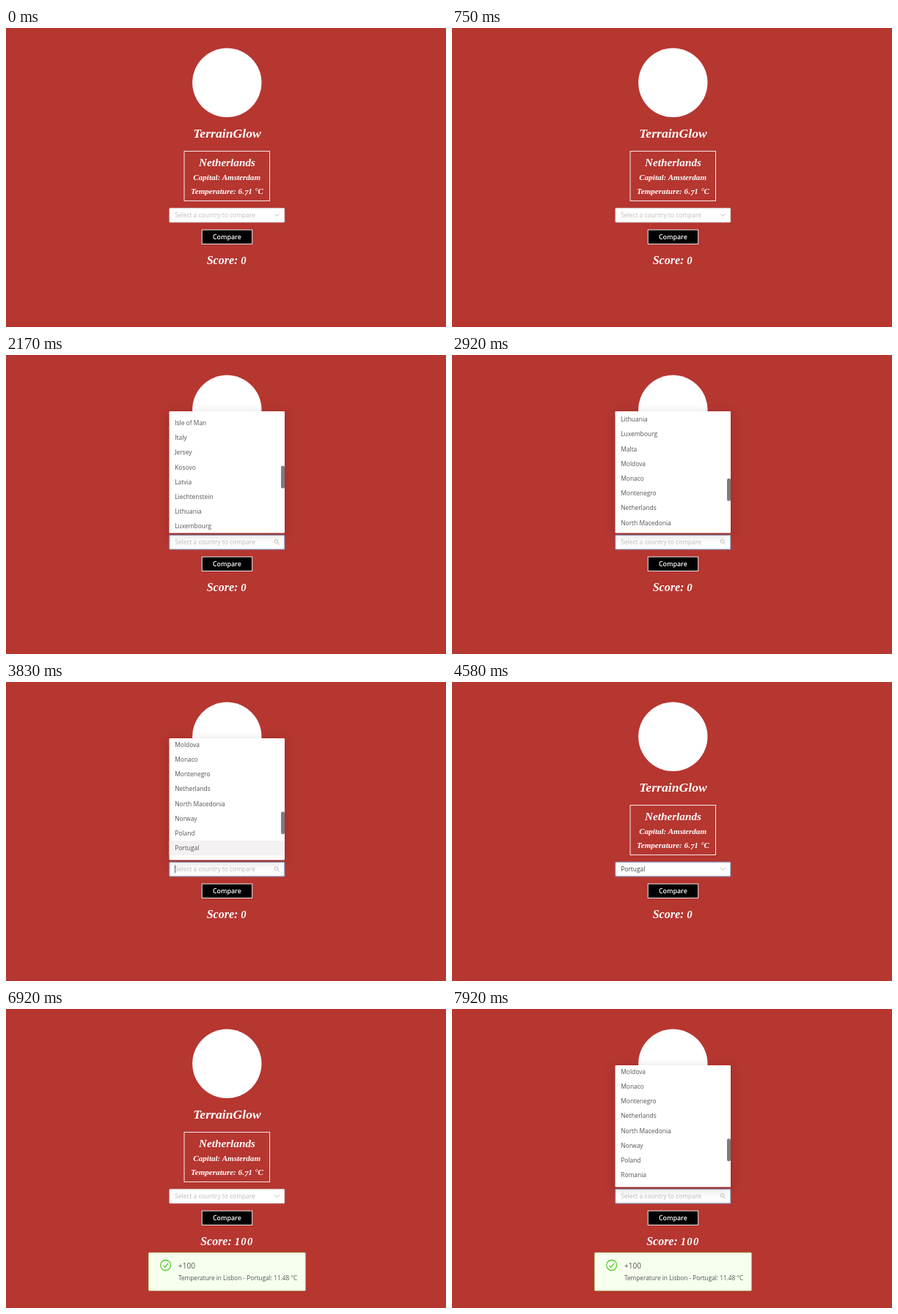
Recreate the animation shown at these times as an HTML page. Size 600 by 409 pixels, loop 8000 ms.

```html
<!DOCTYPE html>
<html lang="en">
<head>
<meta charset="utf-8">
<title>TerrainGlow</title>
<style>
  html, body { margin: 0; width: 100%; height: 100%; overflow: hidden; background: #b63630; }
  #stage { display: block; width: 100vw; height: 100vh; }
  text { white-space: pre; }
  .serif { font: italic bold 11.1px "Liberation Serif", serif; fill: #fff; text-anchor: middle; }
  .sans { font: 8.45px "Open Sans", "Noto Sans", sans-serif; fill: #555; }
  .icon { fill: none; stroke: #b5b5b5; stroke-width: .9; }
  #panel { filter: drop-shadow(0 3px 7px rgba(0, 0, 0, .17)); }
</style>
</head>
<body>
<svg id="stage" viewBox="0 0 600 409">
  <rect width="600" height="409" fill="#b63630"/>
  <circle cx="301.3" cy="74.8" r="47.2" fill="#fff"/>
  <text class="serif" x="301.5" y="149.8" style="font-size:17.7px">TerrainGlow</text>

  <rect x="243" y="168.6" width="116.6" height="67.8" fill="none" stroke="#fff" stroke-width=".9"/>
  <text class="serif" x="301.5" y="188.8" style="font-size:15.2px">Netherlands</text>
  <text class="serif" x="301.2" y="208.2">Capital: Amsterdam</text>
  <text class="serif" id="temperature" x="301.5" y="226.6"></text>

  <rect id="glow" x="222" y="245.5" width="158.6" height="21.2" rx="1.5" fill="#6fa0d8"/>
  <rect id="field" x="222.9" y="246.4" width="156.8" height="19.4" rx="1" fill="#fff" stroke-width=".8"/>
  <text class="sans" id="value" x="230.2" y="259.3"></text>
  <path id="caret" d="M230.5 250.5v11" stroke="#444" stroke-width=".8"/>
  <path class="icon" id="chevron" d="M366.3 254.2l3.1 3.4 3.1-3.4"/>
  <g class="icon" id="search"><circle cx="368.6" cy="255" r="2.4"/><path d="M370.4 256.8l2.6 2.6"/></g>

  <rect x="267.2" y="276.1" width="68.5" height="19.3" stroke="#fff" stroke-width=".9"/>
  <text class="sans" x="301.4" y="288.8" text-anchor="middle" style="font-size:8.9px;font-weight:600;fill:#fff">Compare</text>
  <text class="serif" id="score" x="301.3" y="323" style="font-size:16px"></text>

  <g id="alert">
    <rect x="194.5" y="333.3" width="213.8" height="52" rx="1" fill="#f6ffed" stroke="#b7eb8f" stroke-width=".7"/>
    <g fill="none" stroke="#52d02a" stroke-width="1.3">
      <circle cx="217.7" cy="350.5" r="7"/><path d="M214.4 350.6l2.4 2.6 4.2-5.2"/>
    </g>
    <text class="sans" x="235" y="354.9" style="font-size:10px">+100</text>
    <text class="sans" x="235" y="371.3" style="font-size:8.25px">Temperature in Lisbon - Portugal: 11.48 °C</text>
  </g>

  <g id="menu">
    <rect id="panel" x="222.5" y="77" width="157.5" height="166.5" rx="1" fill="#fff"/>
    <svg x="222.5" y="79.5" width="157.5" height="161.5">
      <rect id="hover" width="157.5" height="20.2" fill="#f4f1f2"/>
      <g id="rows"></g>
    </svg>
    <rect id="thumb" x="375" width="5" height="31" rx="2.5" fill="#7d7d80"/>
  </g>
</svg>
<script>
const LOOP = 8000, TICK = 1000 / 12, ROW = 20.2, WHEEL = 63;
const OPEN = 1400, PICK = 4000, COMPARE = 4650, REOPEN = 7350, HOVER = 3450;
const WHEELS = [1740, 1880, 2000, 2750, 2900, 3050];
const COUNTRIES = ('Albania,Andorra,Austria,Belarus,Belgium,Bosnia and Herzegovina,Bulgaria,Croatia,Cyprus,' +
  'Czechia,Denmark,Estonia,Faroe Islands,Finland,France,Germany,Gibraltar,Greece,Guernsey,Hungary,Iceland,' +
  'Ireland,Isle of Man,Italy,Jersey,Kosovo,Latvia,Liechtenstein,Lithuania,Luxembourg,Malta,Moldova,Monaco,' +
  'Montenegro,Netherlands,North Macedonia,Norway,Poland,Portugal,Romania,Russia,San Marino,Serbia').split(',');
const CHOICE = 'Portugal';

const el = id => document.getElementById(id);
const set = (id, attrs) => { for (const k in attrs) el(id).setAttribute(k, attrs[k]); };
const show = (id, on) => set(id, { visibility: on ? 'visible' : 'hidden' });
const clamp = x => Math.min(1, Math.max(0, x));
const easeOut = x => 1 - (1 - clamp(x)) ** 5;
const easeIn = x => clamp(x) ** 5;

// Old-style figures: 0-2 are smaller, 3-5, 7 and 9 hang below the line.
const figures = text => {
  let low = 0;
  return [...text].map(c => {
    const drop = /[34579]/.test(c) ? 2 : 0;
    const size = /[012]/.test(c) ? 'font-size:.92em;letter-spacing:.08em' : '';
    const shift = drop - low;
    low = drop;
    return `<tspan dy="${shift}" style="${size}">${c}</tspan>`;
  }).join('');
};

let shownCount = 0;
function fillRows(list) {
  if (list.length === shownCount) return;
  shownCount = list.length;
  el('rows').innerHTML = list.map((name, i) =>
    `<text class="sans" x="7.7" y="${i * ROW + 13.1}">${name}</text>`).join('');
}

let shownScore = null;
function setScore(score) {
  if (score === shownScore) return;
  shownScore = score;
  el('score').innerHTML = 'Score: ' + figures(String(score));
}

function draw(t) {
  const compared = t >= COMPARE;
  const focusStart = t >= REOPEN ? REOPEN : OPEN;
  const focused = t >= REOPEN || (t >= OPEN && !compared);
  const picked = t >= PICK && !compared;
  const open = t >= REOPEN ? easeOut((t - REOPEN) / 200)
    : easeOut((t - OPEN) / 200) * (1 - easeIn((t - PICK) / 200));
  const searching = focused && !picked;

  set('glow', { opacity: focused ? .4 * clamp((t - focusStart) / 300) : 0 });
  set('field', { stroke: focused ? '#8794c0' : '#d9d9d9' });
  el('value').textContent = picked ? CHOICE : 'Select a country to compare';
  el('value').style.fill = picked ? '#444' : '#bcbcbc';
  show('caret', searching && Math.floor((t - focusStart) / 500) % 2 === 0);
  show('search', searching);
  show('chevron', !searching);

  fillRows(compared ? COUNTRIES.filter(c => c !== CHOICE) : COUNTRIES);
  const scroll = (4 + WHEELS.filter(w => t >= w).length) * WHEEL;
  const scale = .8 + .2 * open;
  show('menu', open > 0);
  set('menu', { opacity: open, transform: `translate(0 ${243.5 * (1 - scale)}) scale(1 ${scale})` });
  set('rows', { transform: `translate(0 ${-scroll})` });
  set('hover', { y: COUNTRIES.indexOf(CHOICE) * ROW - scroll, opacity: t >= HOVER && !compared ? 1 : 0 });
  set('thumb', { y: 91 + scroll * .137 });

  setScore(compared ? 100 : 0);
  set('alert', { opacity: easeOut((t - COMPARE) / 250) });
}

el('temperature').innerHTML = 'Temperature: ' + figures('6.71 °C');
const start = performance.now();
function frame() {
  const t = (performance.now() - start) % LOOP;
  draw(Math.floor((t + 5) / TICK) * TICK % LOOP);
  requestAnimationFrame(frame);
}
frame();
</script>
</body>
</html>
```
